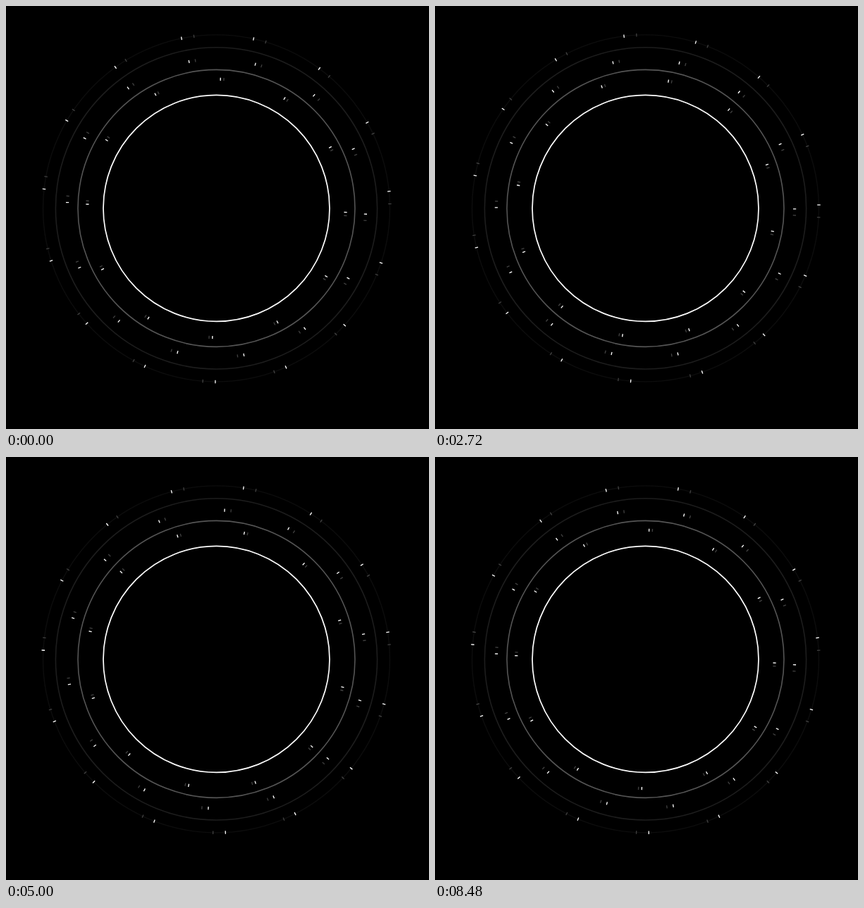
An HTML page that plays this animation: 600 by 600 pixels, repeating every 8.52 s.

```html
<!DOCTYPE html>
<html lang="en">
<head>
<meta charset="utf-8">
<title>Rotating dials</title>
<style>
  html, body { margin: 0; width: 100%; height: 100%; overflow: hidden; background: #000; }
  svg { display: block; width: 600px; height: 600px; }
  circle { fill: none; }

  /* All angles are in degrees: every tick path has a length of 360. */
  .ticks {
    --pitch: calc(360px / var(--count));
    --start: calc(var(--width) / 2 - var(--phase) - var(--shift, 0px));
    stroke: #fff;
    stroke-dasharray: var(--width) calc(var(--pitch) - var(--width));
    animation: turn 8520ms steps(213, end) infinite;
  }
  .dim { --shift: var(--gap); stroke: #404040; }

  .outer  { --count: 15; --width: .31px; --phase: 12.375px; --step: 1.125px; --gap: 4.15px; stroke-width: 4.5; }
  .middle { --count: 14; --width: .36px; --phase: 15.12px;  --step: .7271px; --gap: 2.45px; stroke-width: 4.2; }
  .inner  { --count: 12; --width: .42px; --phase: 1.8px;    --step: .5652px; --gap: 1.5px;  stroke-width: 4.2; }

  @keyframes turn {
    from { stroke-dashoffset: var(--start); }
    to { stroke-dashoffset: calc(var(--start) - 213 * var(--step)); }
  }
</style>
</head>
<body>
<svg viewBox="0 0 600 600">
  <g transform="translate(298.5 286.9) rotate(-90)">
    <circle r="246" stroke="#0d0d0d" stroke-width="1.4"/>
    <circle r="228.1" stroke="#1d1d1d" stroke-width="1.6"/>
    <circle r="196.5" stroke="#555" stroke-width="1.6"/>
    <circle r="160.5" stroke="#fff" stroke-width="1.7"/>

    <circle class="ticks outer dim" r="246" pathLength="360"/>
    <circle class="ticks outer" r="246" pathLength="360"/>
    <circle class="ticks middle dim" r="211.6" pathLength="360"/>
    <circle class="ticks middle" r="211.6" pathLength="360"/>
    <circle class="ticks inner dim" r="183.2" pathLength="360"/>
    <circle class="ticks inner" r="183.2" pathLength="360"/>
  </g>
</svg>
</body>
</html>
```
